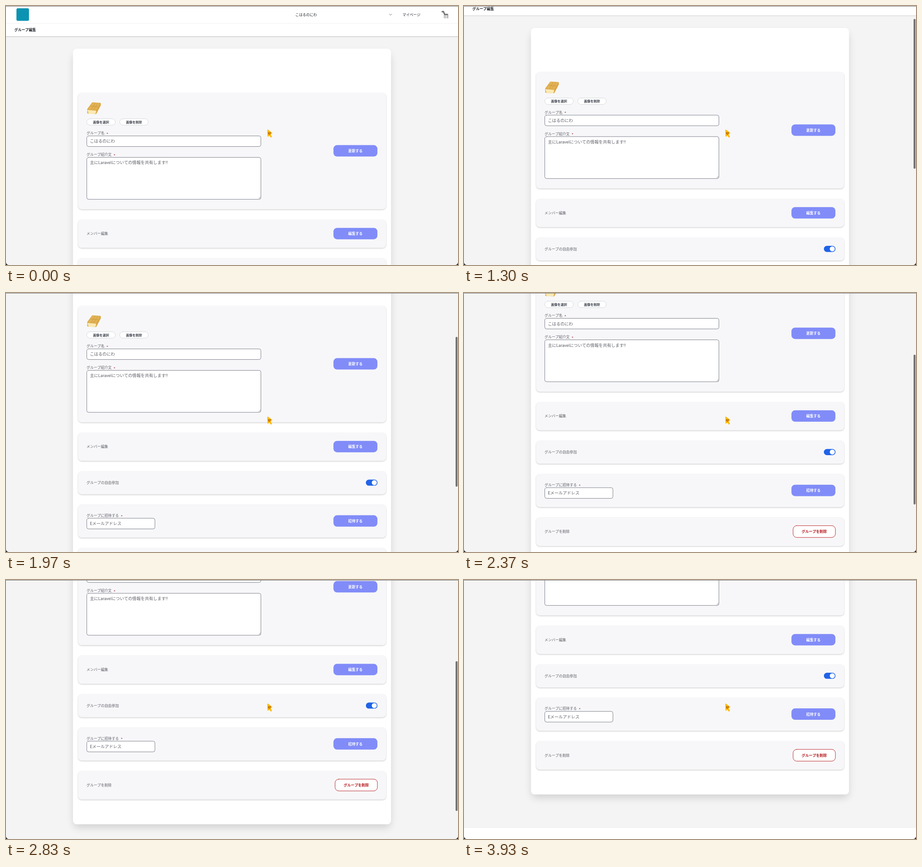
Recreate the animation shown at these times as an HTML page with a canvas. Size 987x567 px, loop 4.1 s.

```html
<!DOCTYPE html>
<html lang="ja">
<head>
<meta charset="utf-8">
<title>グループ編集</title>
<style>
  html, body { margin: 0; width: 100%; height: 100%; overflow: hidden; background: #f4f4f4; }
  canvas { display: block; width: 987px; height: 567px; }
</style>
</head>
<body>
<canvas id="stage" width="987" height="567"></canvas>
<script>
const W = 987, H = 567, LOOP = 4100, FPS = 0.03;
const START = 725, STOP = 3265, END = 367.5;
const LEFT = 176, RIGHT = 811, GAP = 22.7;
const ctx = document.getElementById('stage').getContext('2d');
const FONT = 'Roboto, "Noto Sans CJK JP", "Noto Sans CJK", sans-serif';
const ROOM = 'こはるのにわ';
const INK = '#5d5f67', DARK = '#22252b', BORDER = '#70747f', INDIGO = '#818cf8', RED = '#b4161b';

// A slowly braking scroll, with a soft start
function scrollAt(t) {
  if (t < START) return 0;
  if (t >= STOP) return END;
  const d = t - 1633, soft = 22.8;
  const coast = 103.3 + 0.1798 * d - 1.17e-5 * d * d;
  return soft * Math.log(1 + Math.exp(coast / soft));
}

function rect(x, y, w, h, fill) {
  ctx.fillStyle = fill;
  ctx.fillRect(x, y, w, h);
}

function box(x, y, w, h, r, fill, stroke) {
  ctx.beginPath();
  ctx.roundRect(x, y, w, h, r);
  ctx.fillStyle = fill;
  ctx.fill();
  if (!stroke) return;
  ctx.strokeStyle = stroke;
  ctx.lineWidth = 0.9;
  ctx.stroke();
}

function shadow(dy, blur, alpha, draw) {
  ctx.save();
  ctx.shadowColor = `rgba(0,0,0,${alpha})`;
  ctx.shadowOffsetY = dy;
  ctx.shadowBlur = blur;
  draw();
  ctx.restore();
}

function line(d, color, width, fill) {
  const shape = new Path2D(d);
  ctx.lineJoin = ctx.lineCap = 'round';
  ctx.strokeStyle = color;
  ctx.lineWidth = width;
  ctx.stroke(shape);
  if (!fill) return;
  ctx.fillStyle = fill;
  ctx.fill(shape);
}

function dot(x, y, r, fill) {
  ctx.beginPath();
  ctx.arc(x, y, r, 0, 7);
  ctx.fillStyle = fill;
  ctx.fill();
}

// y is the vertical centre of the glyphs
function text(str, x, y, { size = 7.85, weight = 400, color = INK, align = 'left' } = {}) {
  ctx.font = `${weight} ${size}px ${FONT}`;
  ctx.textAlign = align;
  ctx.fillStyle = color;
  ctx.fillText(str, x, y + size * 0.38);
}

function label(str, y, required) {
  text(str, LEFT - 0.2, y);
  if (!required) return;
  const x = LEFT + str.length * 7.85 + 6;
  text('*', x, y + 0.8, { color: '#a8283a', align: 'center' });
}

function field(y, w, h, str) {
  box(LEFT + 0.4, y + 0.4, w, h, 4, '#fff', BORDER);
  text(str, 183.2, y + 12, { size: 9.1 });
}

function pill(x, y, str) {
  box(x + 0.3, y, 62.4, 14, 7, '#fff', '#d3d5da');
  text(str, x + 31.5, y + 7.1, { size: 7, weight: 700, color: '#3a3f4a', align: 'center' });
}

function button(mid, str, w = 96, h = 25, fill = INDIGO, color = '#fff', stroke) {
  box(RIGHT - w, mid - h / 2, w, h, 8, fill, stroke);
  text(str, RIGHT - w / 2, mid, { weight: 700, color, align: 'center' });
}

// Draws one panel and moves the origin to the top of the next
function section(h, content) {
  shadow(1.2, 3, 0.2, () => box(157.5, 0, 672.5, h, 8, '#f7f7f9'));
  content(h / 2 - 0.4);
  ctx.translate(0, h + GAP);
}

function cake() {
  line('M189 22.5L205.5 23.5V27L196 45L179 44V36Z', '#daa544', 3, '#daa544');
  line('M189 22.5L205 23.5L197 37L180 35.5Z', '#e3b355', 1.5, '#e3b355');
  line('M179 38.5L196 40L194.5 45.5L181 45Z', '#fae9b4', 2, '#fae9b4');
  line('M185 29L201 30.5M194.5 23L187 36M200 23.5L192 36.5', '#c08a32', 0.6);
}

function animal() {
  line('M952.5 12.5L955 12L958 18.5H964', '#777', 3);
  for (const x of [956.5, 959, 962.3, 964.5]) rect(x, 19, 1.1, 8, '#858585');
}

function nav() {
  shadow(0.8, 2.5, 0.22, () => rect(-5, 0, W + 10, 66, '#fff'));
  rect(0, 37.5, W, 1, '#f0f0f2');
  box(22.8, 5, 27.4, 27.6, 3, '#0c93b1');
  text(ROOM, 631.8, 18.7, { weight: 500, color: DARK });
  line('M837 17.6l2.6 2.7l2.6 -2.7', '#6b7280', 1);
  text('マイページ', 865.8, 18.7, { weight: 500, color: DARK });
  animal();
  text('グループ編集', 18.3, 51.6, { weight: 700, color: DARK });
}

function profile(mid) {
  cake();
  pill(LEFT, 56.9, '画像を選択');
  pill(LEFT + 72, 56.9, '画像を削除');
  label('グループ名', 88, true);
  field(94, 380.2, 23.2, ROOM);
  label('グループ紹介文', 135, true);
  field(141, 380.2, 91.8, '主にLaravelについての情報を共有します!!');
  line('M551.8 231.5l3.7 -3.7M554 231.7l1.6 -1.6', '#777', 0.7);
  button(mid, '更新する');
}

function members(mid) {
  label('メンバー編集', mid);
  button(mid, '編集する');
}

function freeJoin(mid) {
  label('グループの自由参加', mid);
  box(RIGHT - 25.2, mid - 6.6, 25.4, 13.4, 6.7, '#2063e8');
  dot(804.2, mid + 0.1, 5.5, '#fff');
}

function invite(mid) {
  label('グループに招待する', 23.5, true);
  field(29.3, 148.8, 23.4, 'Eメールアドレス');
  button(mid, '招待する');
}

function removal(mid) {
  label('グループを削除', mid);
  button(mid, 'グループを削除', 92.4, 25.8, '#fff', RED, RED);
}

function page() {
  rect(0, 0, W, 910.5, '#f4f4f4');
  rect(0, 910.5, W, 80, '#fff');
  nav();
  shadow(9, 17, 0.15, () => box(148, 95.5, 691, 739.5, 8, '#fff'));
  box(146.3, 93.5, 694.4, 743.5, 8, '#fff');
  ctx.translate(0, 190);
  section(255, profile);
  section(61.8, members);
  section(50.5, freeJoin);
  section(72.2, invite);
  section(62.5, removal);
}

function pointer() {
  const gold = '#fdbb16';
  line('M571.5 271.5L580.5 278L572 285Z', gold, 2, gold);
  line('M575 280L578.8 286', gold, 3.6);
  dot(575, 278.8, 3.4, '#f7a313');
  dot(573.5, 278, 0.9, '#54330b');
  dot(576.8, 277.4, 0.9, '#54330b');
  line('M573.8 280.3Q575.8 282 577 279.7', '#8a3a10', 1);
}

function scrollbar(t, s) {
  if (t < START) return;
  ctx.globalAlpha = Math.max(0, Math.min(1, (3890 - t) / 290));
  box(981.7, 1.8 + s * 0.582, 4.3, 328, 2.1, '#737375');
  ctx.globalAlpha = 1;
}

function windowEdge() {
  rect(0, 0, W, 1, '#7b7b7e');
  const r = 6;
  ctx.fillStyle = '#17181a';
  ctx.fill(new Path2D(`M0 ${H - r}A${r} ${r} 0 0 0 ${r} ${H}H0Z`));
  ctx.fill(new Path2D(`M${W} ${H - r}A${r} ${r} 0 0 1 ${W - r} ${H}H${W}Z`));
}

function draw(now) {
  // The picture advances 30 times a second
  const t = Math.floor((now % LOOP + 3.4) * FPS) / FPS;
  const s = scrollAt(t);
  ctx.save();
  ctx.translate(0, -s);
  page();
  ctx.restore();
  scrollbar(t, s);
  pointer();
  windowEdge();
}

const start = performance.now();
function tick() {
  draw(performance.now() - start);
  requestAnimationFrame(tick);
}
tick();
</script>
</body>
</html>
```
